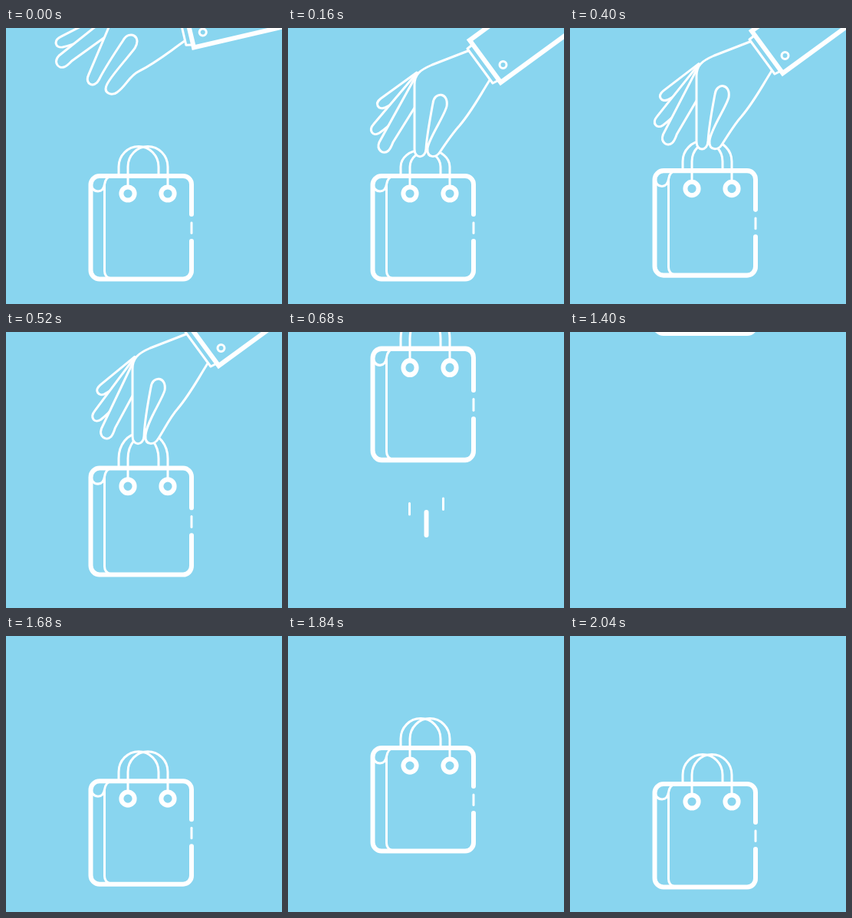
Recreate the animation shown at these times as an HTML page. Size 360 by 360 pixels, loop 2240 ms.

```html
<!DOCTYPE html>
<html lang="en">
<head>
<meta charset="utf-8">
<title>Shopping bag</title>
<style>
  html, body { margin: 0; width: 100%; height: 100%; overflow: hidden; background: #89d5ef; }
  svg { display: block; width: 100vw; height: 100vh; }
  .thick, .thin { fill: none; stroke: #fff; stroke-linecap: round; stroke-linejoin: round; }
  .thick { stroke-width: 6; }
  .thin { stroke-width: 3; }
  .solid { fill: #89d5ef; }
  .sharp { stroke-linejoin: miter; }
</style>
</head>
<body>
<svg viewBox="0 0 360 360">
  <g id="trails">
    <path class="thick" d="M180.5 235V265"/>
    <path class="thin" d="M158.5 223.5V238M202.5 217V231.5"/>
  </g>
  <g id="bag">
    <path id="handles" class="thin"/>
    <path class="thick" d="M242 243V204A11 11 0 0 0 231 193H122A11.5 11.5 0 0 0 110.500 204.500V316A11.5 11.5 0 0 0 122 327.500H231A11 11 0 0 0 242 316V278"/>
    <path class="thin" d="M242 254V267.500"/>
    <path class="thin" d="M111 203Q112 213 120 213Q127 213 128.500 204Q130 194 138 193M128.500 204V317Q128.500 325 137 327"/>
    <g class="thick">
      <circle cx="159" cy="216" r="8.600"/>
      <circle cx="211" cy="216" r="8.600"/>
    </g>
  </g>
  <g id="arm">
    <g id="fingers">
      <path class="thin solid" d="M168 58L121 92C112 99 118 107 126 104L150 92"/>
      <path class="thin solid" d="M167 60L112 125C104 134 111 142 119 137Q128 131 140 119"/>
      <path class="thin solid" d="M166 64L119 149C115 159 124 166 131 160Q134 157 137 149L165 104"/>
    </g>
    <path id="palm" class="thin solid"/>
    <path class="thin solid" d="M239 23L234 27L267 72L273 69"/>
    <path class="thick solid sharp" d="M401 -104L237 16L277.500 71L442 -49"/>
    <circle class="thin" cx="280.500" cy="48" r="4.500"/>
  </g>
</svg>
<script>
const LOOP = 2240, STEP = 40, GRAB = 160, GONE = 800, DROP = 1360;
const $ = id => document.getElementById(id);
const clamp = v => Math.max(0, Math.min(1, v));
const smooth = k => k * k * (3 - 2 * k);

// Slow pull after the grab, then a fast launch
function rise(t, pull, launch, push) {
  const slow = Math.max(0, t - GRAB) / 360, fast = Math.max(0, t - launch);
  return -pull * slow ** 2 - push * fast ** 1.5;
}

// Free fall followed by two shrinking bounces
function drop(t) {
  const height = 330.5, g = 6380e-6, fall = Math.sqrt(2 * height / g);
  let u = t - DROP;
  if (u < fall) return g * u * u / 2 - height;
  u -= fall;
  for (let n = 1; n <= 2; n++) {
    const span = 2 * fall * .39 ** n;
    if (u < span) return -g * u * (span - u) / 2;
    u -= span;
  }
  return 0;
}

// The thumb spreads with open, the fingertips sag with pull
function palmPath(open, pull) {
  const d = 5 * pull, x = 10 * open, y = d + 2 * open;
  return `M237 29L188 48C172 55 165 ${60 + d / 4} 165 ${74 + d / 4}
    V${158 + d}C165 ${171 + d} 179 ${171 + d} 180 ${158 + d}
    C181 140 186 115 189 ${98 + pull}C191 ${82 + pull} 210 ${84 + pull} 207 ${102 + pull}
    C204 115 ${183 + x} 145 ${182 + x} ${157 + y}
    C${181 + x} ${171 + y} ${194 + x} ${169 + y} ${198 + x} ${162 + y}
    C${206 + x} ${150 + y} 214 138 224 127C240 108 248 92 263 68`;
}

const handle = (x, foot, ry) => `M${x} ${foot}V181A26 ${ry} 0 0 1 ${x + 52} 181V${foot}`;
const place = (id, value) => $(id).setAttribute('transform', value);
const show = (id, on) => $(id).setAttribute('visibility', on ? 'visible' : 'hidden');

function draw(t) {
  const leaving = t < DROP;
  const top = 193 + (leaving ? rise(t, 15.5, 535, .0796) : drop(t));
  const bottom = 327.5 + (leaving ? rise(t, 11, 560, .1046) : drop(t));
  const stretch = (bottom - top) / 134.5;
  const open = smooth(clamp(1 - t / GRAB));
  const pull = leaving ? clamp((t - GRAB) / 360) ** 2 : 0;
  const grip = leaving ? 1 - open : 0;

  show('bag', t < GONE || t >= DROP);
  place('bag', `translate(0 ${top - 193 * stretch}) scale(1 ${stretch})`);
  const ry = 26.5 + 5 * (2 * pull - grip);
  $('handles').setAttribute('d', handle(147, 190, ry) + handle(159, 206, ry));

  show('arm', t < GONE);
  const armY = rise(t, 27, 520, .0796) - 45.5 * open;
  place('arm', `translate(${-32.5 * open} ${armY}) rotate(${23 * open} 277.5 71)`);
  $('palm').setAttribute('d', palmPath(open, pull));
  place('fingers', `translate(0 ${1.5 * pull}) rotate(${-.5 * open - 3.5 * pull} 166 62)`);

  show('trails', t >= 640 && t < 1000);
  place('trails', `translate(0 ${(680 - t) * .93})`);
}

const start = performance.now();
function tick() {
  const t = (performance.now() - start) % LOOP;
  draw(Math.floor(t / STEP) * STEP);
  requestAnimationFrame(tick);
}
tick();
</script>
</body>
</html>
```
